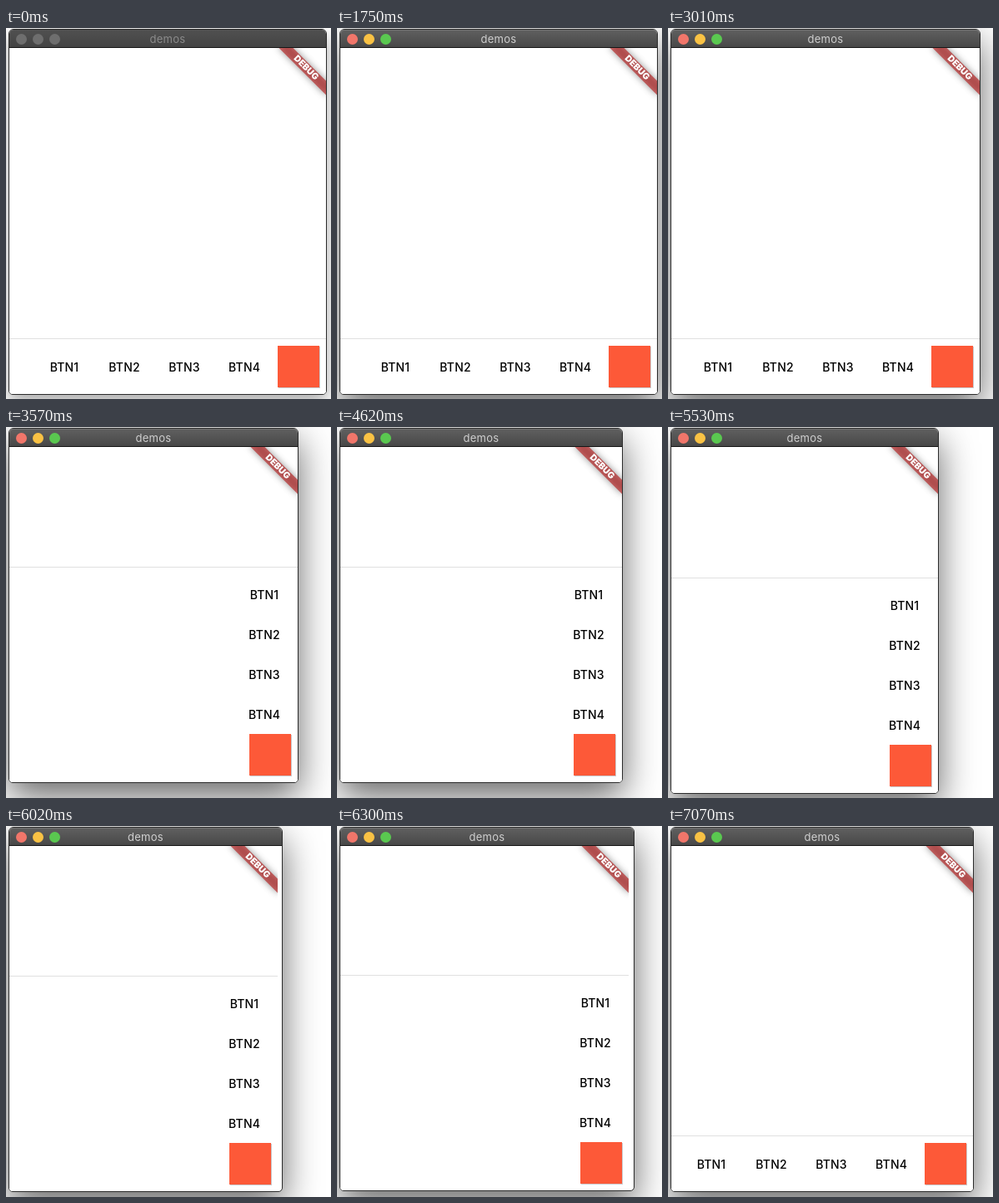
These frames come from a looping animation (390 px wide and 446 px high, 8120 ms). An HTML page:

```html
<!DOCTYPE html>
<html lang="en">
<head>
<meta charset="utf-8">
<title>Resizable window</title>
<style>
  html, body { margin: 0; width: 100%; height: 100%; overflow: hidden; background: #fff; }
  body { position: relative; font-family: Inter, Roboto, sans-serif; }
  #win, #win div { position: absolute; box-sizing: border-box; }
  #win {
    left: 3px; top: 1px;
    border: 1px solid #2b2b2b; border-radius: 6px 6px 5px 5px;
    background: #fff;
    box-shadow: 0 8px 20px rgba(0, 0, 0, .35);
  }
  #win.active { box-shadow: 0 16px 44px rgba(0, 0, 0, .6); }

  #bar {
    left: 0; right: 0; top: 0; height: 22px;
    border-bottom: 1px solid #161616; border-radius: 5px 5px 0 0;
    background: linear-gradient(#505050, #444);
    color: #8b8b8b; font-size: 13px; line-height: 22px;
    letter-spacing: .25px; text-align: center;
  }
  .active #bar {
    background: linear-gradient(#606060, #484848);
    box-shadow: inset 0 1px #727272;
    color: #cfcfcf;
  }
  .light {
    left: calc(7.5px + var(--i) * 20px); top: 4.5px;
    width: 13px; height: 13px; border-radius: 50%; background: #6e6e6e;
  }
  .active .light { background: var(--c); }

  #view { left: 0; top: 22px; bottom: 0; overflow: hidden; border-radius: 0 0 4px 4px; background: #fff; }
  #banner {
    right: -16px; top: 18px; width: 80px; height: 12px;
    transform: rotate(45deg);
    color: #fff; font-size: 10.6px; font-weight: 900; line-height: 12px; text-align: center;
  }
  #banner::before, #banner::after { content: ""; position: absolute; inset: 0; z-index: -1; }
  #banner::before { background: rgba(0, 0, 0, .42); filter: blur(4px); }
  #banner::after { background: rgba(183, 28, 28, .63); }
  #line { left: 0; right: 0; bottom: 66px; height: 1px; background: #e0e0e0; }
  .btn {
    right: calc(62px + var(--i) * 72px); bottom: 8px;
    width: 72px; height: 48px;
    color: #000; font-size: 14px; font-weight: 500; line-height: 48px;
    letter-spacing: .2px; text-align: center;
  }
  #box {
    right: 8px; bottom: 8px; width: 50px; height: 50px;
    background: #fd5938; box-shadow: 1px 1px 0 rgba(120, 120, 130, .4);
  }
  .column #line { bottom: 258px; }
  .column .btn { right: 4px; bottom: calc(57px + var(--i) * 48px); }
</style>
</head>
<body>
<div id="win">
  <div id="bar">demos
    <div class="light" style="--i:0;--c:#f1766a"></div>
    <div class="light" style="--i:1;--c:#fac244"></div>
    <div class="light" style="--i:2;--c:#5ac850"></div>
  </div>
  <div id="view">
    <div id="line"></div>
    <div class="btn" style="--i:3">BTN1</div>
    <div class="btn" style="--i:2">BTN2</div>
    <div class="btn" style="--i:1">BTN3</div>
    <div class="btn" style="--i:0">BTN4</div>
    <div id="box"></div>
    <div id="banner">DEBUG</div>
  </div>
</div>
<script>
  const LOOP = 8120, STEP = 70, FOCUS = 1750, ROW_MIN = 358;

  const win = document.getElementById('win');
  const view = document.getElementById('view');

  // eases from value a to b between two times
  function drag(t, from, to, a, b) {
    const p = Math.min(1, Math.max(0, (t - from) / (to - from)));
    return (b - a) * p * p * (3 - 2 * p);
  }

  function rightEdge(t) {
    return Math.round(385
      + drag(t, 2940, 3010, 385, 375)
      + drag(t, 3010, 3850, 375, 343)
      + drag(t, 4550, 5810, 343, 322)
      + drag(t, 5810, 6510, 322, 367));
  }

  function bottomEdge(t) {
    return Math.round(441
      + drag(t, 3010, 3570, 441, 428)
      + drag(t, 4620, 5530, 428, 441)
      + drag(t, 5810, 6300, 441, 439)
      + drag(t, 6300, 6510, 439, 440));
  }

  function draw(now) {
    const t = Math.floor((now % LOOP) / STEP) * STEP;
    const right = rightEdge(t);
    // the content trails the frame by one step while it grows
    const inner = Math.min(right, rightEdge(t - STEP));

    win.style.width = right - 3 + 'px';
    win.style.height = bottomEdge(t) - 1 + 'px';
    view.style.width = inner - 5 + 'px';
    win.classList.toggle('active', t >= FOCUS);
    view.classList.toggle('column', inner < ROW_MIN);
  }

  const start = performance.now();
  function tick() {
    draw(performance.now() - start);
    requestAnimationFrame(tick);
  }
  tick();
</script>
</body>
</html>
```
